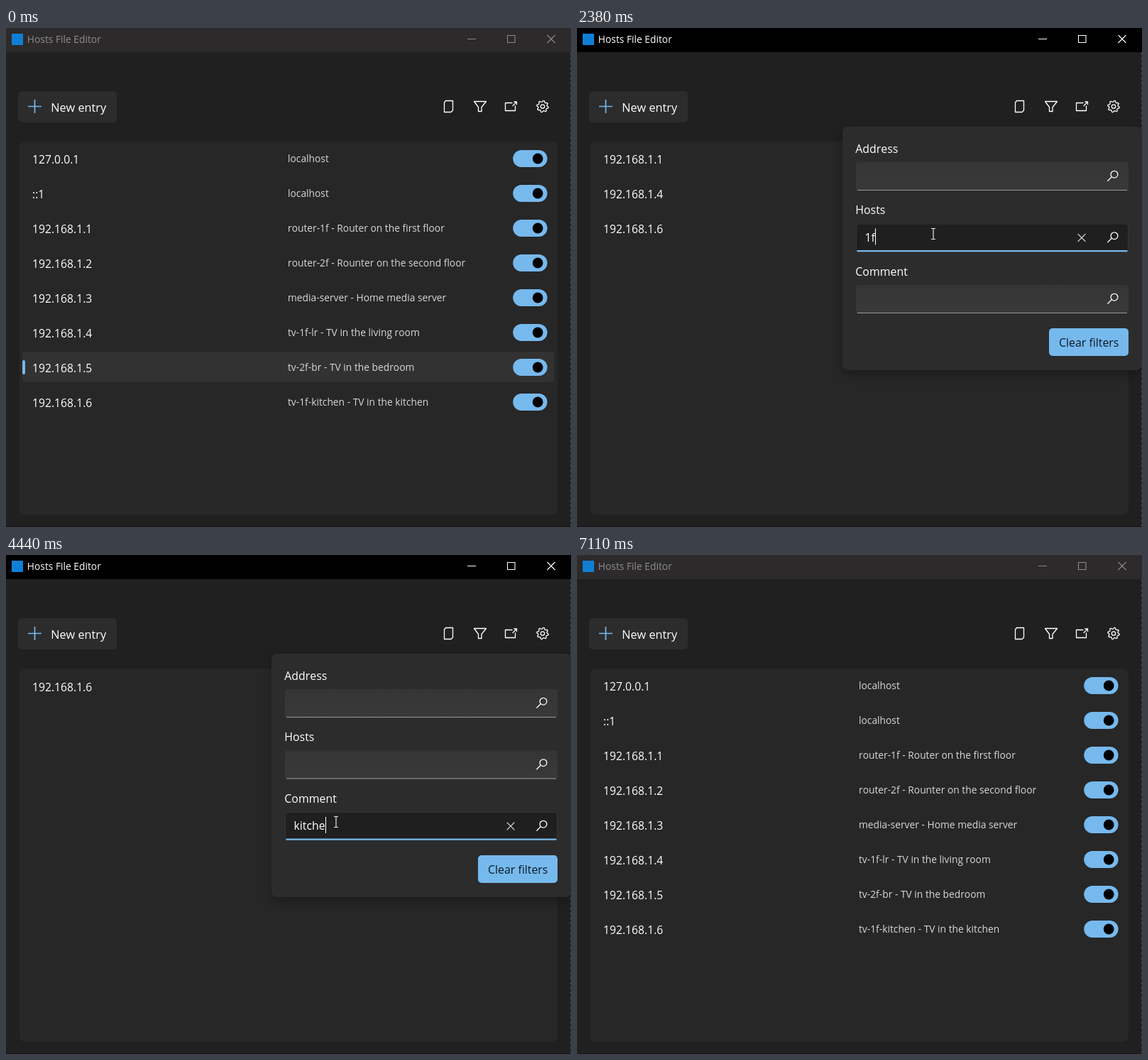
These frames come from a looping animation (796 px wide and 703 px high, 7180 ms). An HTML page:

```html
<!DOCTYPE html>
<html lang="en">
<head>
<meta charset="utf-8">
<title>Hosts File Editor</title>
<style>
  html, body { margin: 0; width: 100%; height: 100%; overflow: hidden; background: #202020; }
  svg { display: block; width: 796px; height: 703px; font-family: "Open Sans", "Noto Sans", sans-serif; font-kerning: none; }
  text { white-space: pre; }
  .icon { fill: none; stroke: #fff; stroke-width: 1.3; stroke-linejoin: round; stroke-linecap: round; }
  .label { font-size: 15.9px; fill: #fff; }
  .addr { font-size: 15.7px; fill: #fff; }
  .host { font-size: 13.8px; fill: #d8d8d8; }
  #card { filter: drop-shadow(0 6px 8px rgba(0, 0, 0, .28)); }
</style>
</head>
<body>
<svg id="stage" viewBox="0 0 796 703">
  <defs>
    <linearGradient id="fieldFill" x1="0" y1="0" x2="0" y2="1">
      <stop offset="0" stop-color="#353535"/><stop offset="1" stop-color="#393939"/>
    </linearGradient>
  </defs>
  <rect width="796" height="703" fill="#202020"/>
  <rect id="bar" width="796" height="34"/>
  <rect x="8" y="8" width="16" height="16" fill="#0f7fd6"/>
  <text id="title" x="29.8" y="21" font-size="13.8">Hosts File Editor</text>
  <path id="controls" d="M650 15.5H662M706.5 10.5H717V20.5H706.5ZM762.5 10L773.5 21M773.5 10L762.5 21" fill="none" stroke-width="1.1"/>

  <rect x="17" y="89" width="139" height="44" rx="5" fill="#2c2c2c"/>
  <path d="M31 110.5H50M40.5 101V120" stroke="#76b9ed" stroke-width="1.7"/>
  <text x="63.2" y="118" font-size="16.3" fill="#fff">New entry</text>

  <rect id="filterHover" x="645" y="89" width="44.5" height="43.5" rx="5" fill="#2d2d2d"/>
  <g class="icon">
    <path d="M619.5 102.5H629.5V116L627 118.5H617.5V105Z"/>
    <path d="M659.5 103.5H676.5L670 111.5V117.5H665.5V111.5Z"/>
    <path d="M713 105.5H703.5V116.5H717.5V110M714 109.5L719.3 104.2M715.8 104H719.5V107.7"/>
    <path id="gear"/>
    <circle cx="756" cy="110.5" r="2.7"/>
  </g>

  <rect x="19" y="160" width="758" height="526" rx="8" fill="#272727"/>
  <g id="selected">
    <rect x="23" y="456" width="749" height="43" rx="4" fill="#323232"/>
    <rect x="23" y="468" width="4" height="20" rx="2" fill="#76b9ed"/>
  </g>
  <g id="rows"></g>

  <path d="M795.5 34V703" stroke="#4a4a4a" stroke-dasharray="4 3"/>
  <path d="M0 702.5H796" stroke="#191315"/>

  <g id="flyout">
    <rect id="card" x="374" y="139" width="422" height="343" rx="8" fill="#2c2c2c"/>
    <g id="fields"></g>
    <rect id="clear" x="665" y="423" width="112" height="39" rx="5"/>
    <text class="label" x="679" y="449" style="fill:#0b1a26">Clear filters</text>
  </g>

  <g id="cursor">
    <path id="arrow" d="M0 0V15.5L3.6 12.2L6.1 18L8.7 16.9L6.3 11.3H11Z" fill="#fff" stroke="#000" stroke-width=".8"/>
    <path id="beam" d="M-3 -7.5H3M0 -7.5V7.5M-3 7.5H3" stroke="#e4e4e4" stroke-width="1.2"/>
  </g>
</svg>
<script>
const LOOP = 7180, ROW = 49, SLIDE = 560;
const $ = id => document.getElementById(id);

const entries = [
  ['127.0.0.1', 'localhost', ''],
  ['::1', 'localhost', ''],
  ['192.168.1.1', 'router-1f', 'Router on the first floor'],
  ['192.168.1.2', 'router-2f', 'Rounter on the second floor'],
  ['192.168.1.3', 'media-server', 'Home media server'],
  ['192.168.1.4', 'tv-1f-lr', 'TV in the living room'],
  ['192.168.1.5', 'tv-2f-br', 'TV in the bedroom'],
  ['192.168.1.6', 'tv-1f-kitchen', 'TV in the kitchen']
];

// time, then the text of the Address, Hosts and Comment filters
const edits = [
  [420, '1', '', ''], [480, '19', '', ''], [540, '192', '', ''],
  [2100, '', '1', ''], [2140, '', '1f', ''],
  [3900, '', '', ''],
  ...[...'kitche'].map((_, i) => [4140 + 26 * i, '', '', 'kitche'.slice(0, i + 1)]),
  [4510, '', '', 'kitchen'],
  [6400, '', '', '']
];

// time, focused field (-1 is none)
const focuses = [[0, -1], [280, 0], [1680, 0], [2030, 1], [3410, 0], [3900, -1],
  [4110, 2], [5850, 0], [6400, -1]];

// opening and closing times of the flyout
const flyouts = [[280, 690], [1680, 2660], [3410, 5460], [5850, 6830]];

// time, x, y of the pointer
const path = [
  [70, 784, 240], [210, 668, 112], [280, 668, 112], [400, 560, 210], [600, 560, 210],
  [690, 610, 566], [770, 600, 422], [840, 598, 418], [1120, 735, 76], [1400, 675.5, 105],
  [1680, 675.5, 105], [2030, 502, 290], [2400, 502, 290], [2660, 350, 450], [3000, 668, 113],
  [3480, 668, 113], [3760, 721, 445], [3900, 721, 445], [4110, 465, 376], [5240, 465, 376],
  [5460, 480, 548], [5640, 640, 28], [5780, 668, 112], [5900, 668, 112], [6200, 727, 445],
  [6420, 727, 445], [6760, 700, 536], [6830, 690, 600], [6960, 680, 661]
];

const last = (table, t) => table.filter(e => e[0] <= t).pop();
const inside = (p, x, y, w, h) => p[0] >= x && p[0] < x + w && p[1] >= y && p[1] < y + h;
const show = (el, on) => { el.style.display = on ? '' : 'none'; };

$('gear').setAttribute('d', 'M' + Array.from({ length: 32 }, (_, i) => {
  const a = (i + .5) * Math.PI / 16, r = i % 4 < 2 ? 8.2 : 6.3;
  return (756 + r * Math.cos(a)).toFixed(2) + ' ' + (110.5 + r * Math.sin(a)).toFixed(2);
}).join('L') + 'Z');

$('rows').innerHTML = entries.map(([addr, host, note]) => `<g>
  <text class="addr" x="37" y="191">${addr}</text>
  <text class="host" x="397" y="189">${host}${note && ' - ' + note}</text>
  <rect x="714.2" y="172" width="48.4" height="24" rx="12" fill="#76b9ed"/>
  <circle cx="749.2" cy="184" r="7.4"/></g>`).join('');

const fieldY = [189, 275.5, 362];
$('fields').innerHTML = ['Address', 'Hosts', 'Comment'].map((name, i) => `<g transform="translate(0 ${fieldY[i]})">
  <text class="label" x="392.3" y="-13.5">${name}</text>
  <g class="rest"><rect x="393" width="384" height="40" rx="4" fill="url(#fieldFill)"/>
    <path d="M395 39.5H775" stroke="#9a9a9a"/></g>
  <g class="focus"><rect x="393.5" y=".5" width="383" height="39" rx="4" fill="#1f1f1f" stroke="#353535"/>
    <path d="M394.5 38.7H775.5" stroke="#76b9ed" stroke-width="2.2"/>
    <path class="caret" d="M0 7V30" stroke="#fff"/></g>
  <text class="label value" x="405.5" y="25"></text>
  <path class="icon cross" d="M706 15L716 25M716 15L706 25" style="stroke:#ccc;stroke-width:1.2"/>
  <path class="icon" d="M747.8 26.2L753.2 20.8"/><circle class="icon" cx="757" cy="17.2" r="4.9"/>
</g>`).join('');

const rowEls = [...$('rows').children];
const fields = [...$('fields').children].map(g => {
  const get = c => g.querySelector('.' + c);
  return { rest: get('rest'), focus: get('focus'), caret: get('caret'), value: get('value'), cross: get('cross') };
});

function pointer(t) {
  const i = path.findIndex(p => p[0] > t);
  if (i < 1) return path[i < 0 ? path.length - 1 : 0].slice(1);
  const a = path[i - 1], b = path[i];
  const k = (t - a[0]) / (b[0] - a[0]), e = k * k * (3 - 2 * k);
  return [a[1] + (b[1] - a[1]) * e, a[2] + (b[2] - a[2]) * e];
}

// opacity and vertical shift of the flyout
function flyoutPose(t) {
  const f = last(flyouts, t);
  if (!f || t >= f[1] + 70) return [0, 0];
  if (t >= f[1]) return [.4, 0];
  const age = t - f[0];
  return age < 70 ? [.43, -6] : age < 140 ? [1, -1] : [1, 0];
}

function drawRows(t, edit) {
  const left = edit ? Math.max(0, 1 - (t - edit[0]) / SLIDE) : 0;
  let y = 6 * left ** 5;
  entries.forEach((entry, i) => {
    const on = !edit || entry.every((s, c) => s.includes(edit[c + 1]));
    show(rowEls[i], on);
    if (!on) return;
    rowEls[i].setAttribute('transform', `translate(0 ${y.toFixed(2)})`);
    y += ROW;
  });
}

function drawFields(t, edit) {
  const active = last(focuses, t)[1];
  fields.forEach((f, i) => {
    const text = edit ? edit[i + 1] : '', on = i === active;
    f.value.textContent = text;
    show(f.rest, !on);
    show(f.focus, on);
    show(f.cross, on && text);
    if (on) {
      const x = text ? Math.round(406 + f.value.getComputedTextLength()) + .5 : 406.5;
      f.caret.setAttribute('transform', `translate(${x} 0)`);
    }
  });
}

function draw(t) {
  const active = t >= 70 && t < 7110, edit = last(edits, t);
  $('bar').setAttribute('fill', active ? '#000' : '#2c2a2b');
  $('title').setAttribute('fill', active ? '#fff' : '#8f8f8f');
  $('controls').setAttribute('stroke', active ? '#fff' : '#8a8a8a');
  show($('selected'), !edit);
  drawRows(t, edit);

  const [alpha, dy] = flyoutPose(t), p = pointer(t);
  show($('flyout'), alpha);
  $('flyout').setAttribute('opacity', alpha);
  $('flyout').setAttribute('transform', `translate(0 ${dy})`);
  if (alpha) drawFields(t, edit);

  const seen = t >= 70 && t < 6970;
  const beam = alpha === 1 && fieldY.some(y => inside(p, 393, y, 300, 40));
  show($('filterHover'), seen && inside(p, 645, 89, 45, 44));
  $('clear').setAttribute('fill', seen && inside(p, 665, 423, 112, 39) ? '#6ca9d9' : '#76b9ed');
  show($('cursor'), seen);
  show($('arrow'), !beam);
  show($('beam'), beam);
  $('cursor').setAttribute('transform', `translate(${p[0].toFixed(1)} ${p[1].toFixed(1)})`);
}

const start = performance.now();
function tick() {
  draw((performance.now() - start) % LOOP);
  requestAnimationFrame(tick);
}
tick();
</script>
</body>
</html>
```
